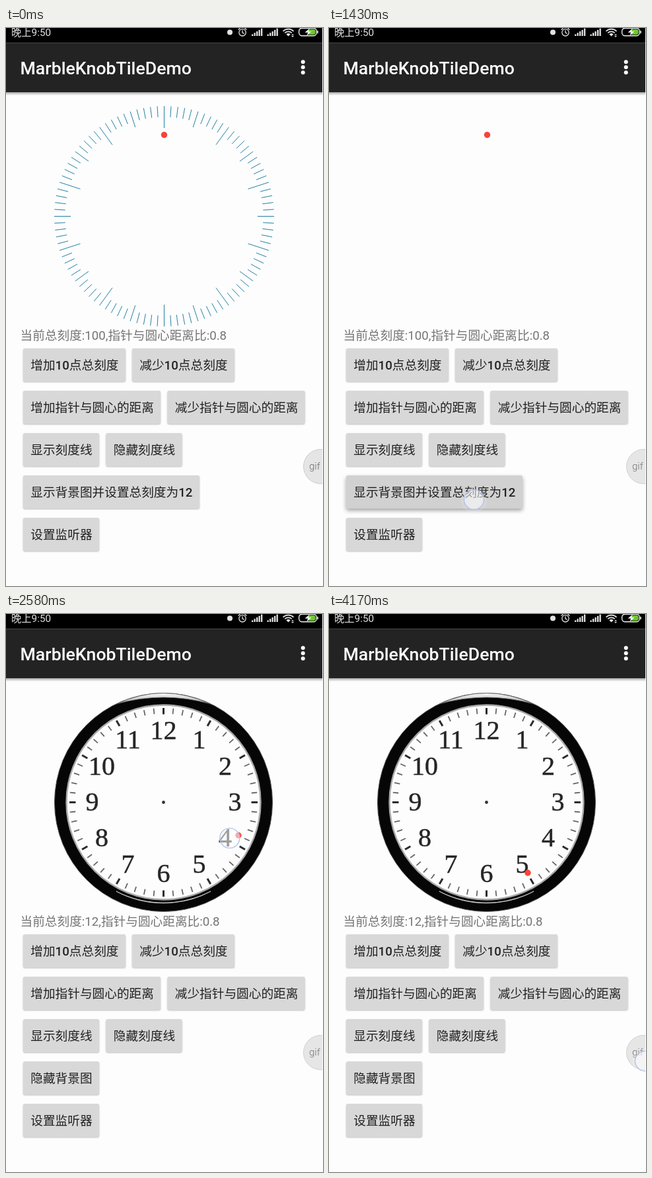
Animation of 480x843 px, one loop 4.27 s. Source, as an HTML page:

```html
<!DOCTYPE html>
<html lang="zh-CN">
<head>
<meta charset="utf-8">
<title>Dial demo</title>
<style>
html, body { margin: 0; width: 100%; height: 100%; overflow: hidden; background: #fdfdfd; }
svg { display: block; width: 100vw; height: 100vh; font-family: Roboto, "Noto Sans CJK SC", "Noto Sans CJK", sans-serif; }
.label { font-size: 18.67px; fill: #212121; }
.num { font-weight: 500; }
.face { font: 40px "Liberation Serif", "Noto Serif", serif; fill: #262626; stroke: #262626; stroke-width: .5px; text-anchor: middle; }
.key { filter: drop-shadow(0 1.3px 1px rgba(0,0,0,.26)); }
.key.up { filter: drop-shadow(0 3px 3px rgba(0,0,0,.36)); }
</style>
</head>
<body>
<svg id="stage" viewBox="0 0 480 843"></svg>
<script>
const LOOP = 4270;
const CX = 239.5, CY = 284.5;
const STEPS = [0, 130, 510, 710, 750, 850, 950, 1050, 1150, 1250, 1350, 1440, 1530, 1620, 1710,
  1820, 1910, 2010, 2190, 2290, 2390, 2480, 2580, 2670, 2760, 2860, 2950, 3050, 3150, 3240,
  3350, 3450, 3760, 4030, 4170];

const polar = (deg, r, cx = CX, cy = CY) => {
  const a = deg * Math.PI / 180;
  return [cx + r * Math.sin(a), cy - r * Math.cos(a)];
};
const range = (n, fn) => Array.from({ length: n }, (_, i) => fn(i)).join("");
const rect = (x, y, w, h, attrs) => `<rect x="${x}" y="${y}" width="${w}" height="${h}" ${attrs}/>`;
const circle = (x, y, r, attrs) => `<circle cx="${x}" cy="${y}" r="${r}" ${attrs}/>`;
const spoke = (deg, r1, r2, attrs, cx, cy) => {
  const [x1, y1] = polar(deg, r1, cx, cy), [x2, y2] = polar(deg, r2, cx, cy);
  return `<line x1="${x1}" y1="${y1}" x2="${x2}" y2="${y2}" ${attrs}/>`;
};

// Piecewise linear value through [time, value] points
function track(points, t) {
  if (t <= points[0][0]) return points[0][1];
  for (let i = 1; i < points.length; i++) {
    const [t0, v0] = points[i - 1], [t1, v1] = points[i];
    if (t <= t1) return v0 + (v1 - v0) * (t - t0) / (t1 - t0);
  }
  return points[points.length - 1][1];
}

function button(id, x, y, w, text) {
  const label = text.replace(/\d+/g, n => `<tspan class="num">${n}</tspan>`);
  return `<g id="${id}">
    ${rect(x, y, w, 50, 'rx="2.7" fill="#d8d8d8" class="key"')}
    ${rect(x, y, w, 50, 'rx="2.7" fill="#9ba59b" class="tint" opacity="0"')}
    <text class="label" x="${x + 11.3}" y="${y + 32}">${label}</text></g>`;
}

function statusBar() {
  const bars = x => range(5, i => rect(x + i * 3.5, 9.5 - i * 2.2, 2.3, 2.5 + i * 2.2, 'fill="#e2e2e2"'));
  return rect(0, 0, 480, 22.5, 'fill="#000"') +
    `<text x="8" y="12" font-size="15.3" fill="#e2e2e2">晚上9:50</text>
    ${circle(339, 6.5, 4, 'fill="#e2e2e2"')}
    <g fill="none" stroke="#e2e2e2" stroke-width="1.3">
      ${circle(358, 6.8, 5.2, "")}
      <path d="M358 3.6V7l2.6 1.4M351.6 2.8l3-2.6M364.4 2.8l-3-2.6"/>
      <path d="M419.5 4.8a11.8 11.8 0 0 1 16 0M422.2 7.5a7.8 7.8 0 0 1 10.6 0" stroke-width="1.7"/>
    </g>
    ${bars(372)}${bars(395.5)}
    <path d="M424.4 9.4a4.6 4.6 0 0 1 6.2 0L427.5 12.6z" fill="#e2e2e2"/>
    <path id="arrows" d="M432 11h4l-2-2zM432 12h4l-2 2z" fill="#e2e2e2"/>
    ${rect(443.6, .2, 26.6, 11.6, 'rx="4.8" fill="none" stroke="#eee" stroke-width="1.4"')}
    <path d="M458 1.8h7.2a3.4 3.4 0 0 1 3.4 3.4v1.6a3.4 3.4 0 0 1-3.4 3.4H458z" fill="#6cc62f"/>
    ${rect(471.2, 4, 1.5, 4.2, 'fill="#eee"')}
    <path d="M459.5 .8l-7 6h4.6l-1.6 4.6 7-6.2h-4.6z" fill="#fff"/>`;
}

function toolbar() {
  return rect(0, 96, 480, 6, 'fill="url(#drop)"') +
    rect(0, 22.5, 480, 74.5, 'fill="#232323"') +
    `<text x="21.5" y="69.5" font-size="26.67" font-weight="500" fill="#fff">MarbleKnobTileDemo</text>` +
    range(3, i => circle(449.7, 51.3 + i * 8, 3, 'fill="#fff"'));
}

function ticks() {
  const len = i => i % 10 === 0 ? 33 : i % 5 === 0 ? 25 : 16.5;
  return `<g id="ticks" stroke="#2580a3" stroke-width="1">
    ${range(100, i => spoke(i * 3.6, 166.5, 166.5 - len(i), ""))}</g>`;
}

function clock() {
  const x = 238.5, y = 284.5;
  const marks = range(60, i => i % 5
    ? spoke(i * 6, 142.5, 134, 'stroke="#666" stroke-width="1.8"', x, y)
    : spoke(i * 6, 142.5, 133, 'stroke="#2c2c2c" stroke-width="3"', x, y));
  const digits = range(12, i => {
    const [dx, dy] = polar(i * 30, 108, x, y);
    return `<text class="face" x="${dx}" y="${dy + 12.5}">${i || 12}</text>`;
  });
  return `<g id="clock">
    ${circle(x, y, 165, 'fill="#060606" stroke="#555" stroke-width="1"')}
    ${circle(x, y, 147, 'fill="#fdfdfd" stroke="#a9a9a9" stroke-width="2.4"')}
    <path d="M167 136Q238.5 103 310 136Q238.5 116 167 136z" fill="url(#shine)" stroke="#555" stroke-width=".8"/>
    <path d="M167 419A153 153 0 0 0 310 419A157 157 0 0 1 167 419z" fill="#c8c8c8" stroke="#c4c4c4" stroke-width="1.2"/>
    ${marks}${digits}${circle(x, y, 2.4, 'fill="#333"')}</g>`;
}

const stage = document.getElementById("stage");
stage.innerHTML = `<defs>
  <linearGradient id="drop" x2="0" y2="1"><stop stop-color="#000" stop-opacity=".4"/><stop offset="1" stop-color="#000" stop-opacity="0"/></linearGradient>
  <linearGradient id="shine" x2="0" y2="1"><stop stop-color="#fafafa"/><stop offset="1" stop-color="#aaa"/></linearGradient>
  </defs>` +
  rect(0, 0, 480, 843, 'fill="#fdfdfd"') + toolbar() + statusBar() + ticks() + clock() +
  circle(0, 0, 4.7, 'id="dot" fill="#f9423a"') +
  `<text id="info" x="21.5" y="471" font-size="18.67" fill="#757575"></text>` +
  button("more", 26, 484, 155, "增加10点总刻度") +
  button("less", 191, 484, 155, "减少10点总刻度") +
  button("far", 26, 548, 208, "增加指针与圆心的距离") +
  button("near", 244.5, 548, 208, "减少指针与圆心的距离") +
  button("show", 26, 612, 115, "显示刻度线") +
  button("hide", 151.5, 612, 115, "隐藏刻度线") +
  button("showBg", 26, 676, 267, "显示背景图并设置总刻度为12") +
  button("hideBg", 26, 676, 115, "隐藏背景图") +
  button("listen", 26, 740, 115, "设置监听器") +
  `<g id="bubble">${circle(476.5, 662.5, 26, 'fill="#e5e5e5" stroke="#cbcbcb" stroke-width="1"')}
    <text x="459" y="667" font-size="15" font-weight="300" fill="#686868">gif</text></g>
  <g id="touch">${circle(0, 0, 20, 'fill="#fff" opacity=".1"')}
    ${circle(0, 0, 15, 'fill="#fff" fill-opacity=".5" stroke="#b5c3ec" stroke-width="1.4"')}</g>` +
  rect(479, 0, 1, 843, 'fill="#fdfdfd"');

const el = {};
stage.querySelectorAll("[id]").forEach(node => el[node.id] = node);
const show = (node, on) => node.setAttribute("visibility", on ? "visible" : "hidden");
const place = (node, [x, y]) => node.setAttribute("transform", `translate(${x} ${y})`);
function press(node, level, up) {
  node.querySelector(".tint").setAttribute("opacity", level);
  node.querySelector(".key").classList.toggle("up", up);
}

const DOT = [[2190, 0], [2290, 3], [2390, 37], [2480, 74], [2580, 113.9], [2670, 135], [2760, 137]];
const HAND = [[2190, 0], [2290, 8], [2390, 42], [2480, 80], [2580, 118.6], [2670, 137]];
const REACH = [[2190, 135], [2290, 133], [2390, 128], [2480, 105], [2580, 113], [2670, 132], [2860, 150], [3050, 164.5]];
const TAPS = [
  { on: 510, fade: 850, off: 950, rest: .4, at: () => [211, 637] },
  { on: 1250, fade: 1530, off: 1710, rest: .6, at: () => [219.5, 712.5] },
  { on: 2190, fade: 3350, off: 3450, rest: .22, at: t => polar(track(HAND, t), track(REACH, t)) },
  { on: 4170, fade: LOOP, off: LOOP, rest: 1, at: () => [478.5, 675.5] }
];

function draw(now) {
  const time = now % LOOP;
  const t = STEPS.filter(s => s <= time).pop();
  const dialOn = t < 710, clockOn = t >= 1440;

  show(el.ticks, dialOn);
  show(el.clock, clockOn);
  show(el.showBg, !clockOn);
  show(el.hideBg, clockOn);
  show(el.arrows, t < 3050 || t >= 4030);
  el.info.textContent = `当前总刻度:${clockOn ? 12 : 100},指针与圆心距离比:0.8`;
  el.bubble.setAttribute("opacity", t < 130 ? 1 : .93);

  press(el.hide, track([[700, 0], [710, .14], [850, .18], [1150, .08], [1250, 0]], t), t >= 710 && t < 950);
  press(el.showBg, track([[1250, 0], [1350, .14]], t), t >= 1350);
  press(el.hideBg, track([[1440, .2], [1530, .24], [1710, .2], [2010, 0]], t), false);

  place(el.dot, polar(t < 3350 ? track(DOT, t) : 150, 123));

  const tap = TAPS.find(p => t >= p.on && t < p.off);
  show(el.touch, tap);
  if (tap) {
    place(el.touch, tap.at(t));
    el.touch.setAttribute("opacity", t < tap.fade ? 1 : tap.rest);
  }
}

const start = performance.now();
function tick() {
  draw(performance.now() - start);
  requestAnimationFrame(tick);
}
tick();
</script>
</body>
</html>
```
